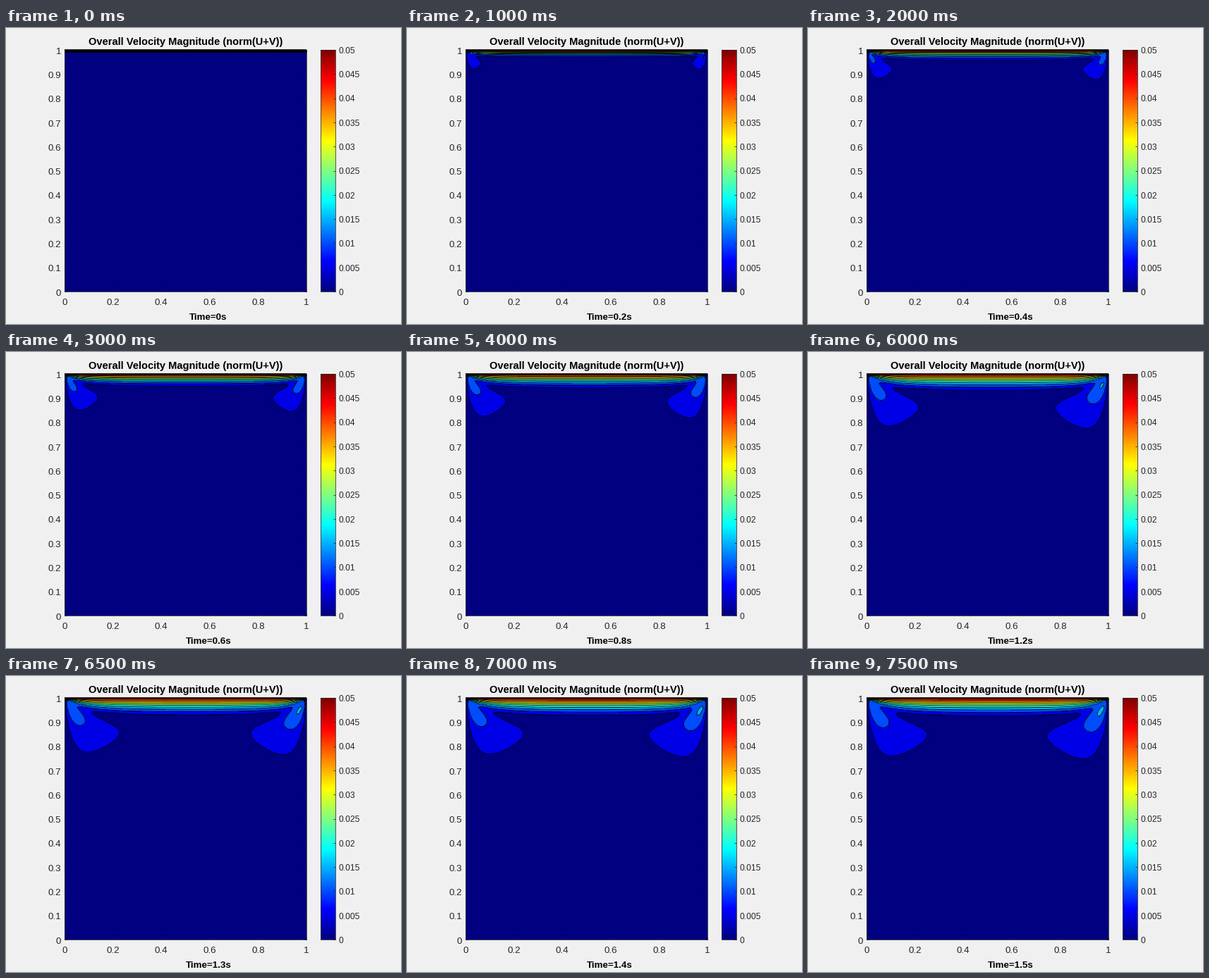
These frames come from a looping animation (560 by 420 pixels, 8 s). A matplotlib script:

```python
import numpy as np
import matplotlib.pyplot as plt
from matplotlib.animation import FuncAnimation
from matplotlib.colors import ListedColormap
from matplotlib.patches import Rectangle

W, H, DPI = 560, 420, 100
FRAMES, INTERVAL = 16, 500
LEFT, TOP, SIDE = 83, 31, 343
BAR_X, BAR_W = 446, 21
RIGHT, BOTTOM = LEFT + SIDE, TOP + SIDE
INK = "#262626"

# Lid-driven cavity on a staggered grid
N = 99
STEP = 1 / (N + 1)
LID, NU, DT = 0.05, 1e-3, 0.005
STEPS_PER_FRAME = 20

k = np.arange(N)
COS = np.cos(np.pi * np.outer(k, k + 0.5) / N) * np.sqrt(2 / N)
COS[0] /= np.sqrt(2)
eig = (2 * np.cos(np.pi * k / N) - 2) / STEP**2
EIG = eig[:, None] + eig[None, :]
EIG[0, 0] = 1


def rate(a, b):
    """Diffusion minus advection of padded component a, carried across by b."""
    c = a[1:-1, 1:-1]
    up, down, east, west = a[2:, 1:-1], a[:-2, 1:-1], a[1:-1, 2:], a[1:-1, :-2]
    cross = (b[:-1, 1:-2] + b[1:, 1:-2] + b[:-1, 2:-1] + b[1:, 2:-1]) / 4
    diffusion = NU * (up + down + east + west - 4 * c) / STEP**2
    return diffusion - (c * (east - west) + cross * (up - down)) / (2 * STEP)


def advance(u, v):
    du, dv = rate(u, v), rate(v.T, u.T).T
    u[1:-1, 1:-1] += DT * du
    v[1:-1, 1:-1] += DT * dv
    div = (np.diff(u[1:-1], axis=1) + np.diff(v[:, 1:-1], axis=0)) / STEP
    spec = COS @ div @ COS.T / EIG
    spec[0, 0] = 0
    phi = COS.T @ spec @ COS
    u[1:-1, 1:-1] -= np.diff(phi, axis=1) / STEP
    v[1:-1, 1:-1] -= np.diff(phi, axis=0) / STEP


def speed(u, v):
    s = np.zeros((N + 2, N + 2))
    uc = (u[1:-1, 1:] + u[1:-1, :-1]) / 2
    vc = (v[1:, 1:-1] + v[:-1, 1:-1]) / 2
    s[1:-1, 1:-1] = np.hypot(uc, vc)
    s[-1] = LID
    return s


def simulate():
    u, v = np.zeros((N + 2, N + 1)), np.zeros((N + 1, N + 2))
    u[-1] = LID
    fields = [speed(u, v)]
    for _ in range(FRAMES - 1):
        for _ in range(STEPS_PER_FRAME):
            advance(u, v)
        fields.append(speed(u, v))
    return fields


def jet(t):
    t = np.asarray(t)[:, None]
    return np.clip(1.5 - np.abs(4 * t - np.array([3, 2, 1])), 0, 1)


fields = simulate()
nodes = np.linspace(0, 1, N + 2)
px, py = LEFT + SIDE * nodes, BOTTOM - SIDE * nodes
levels = np.linspace(0, LID, 11)
bands = jet(np.arange(10) / 10)

plt.rcParams["font.family"] = "Liberation Sans"
fig = plt.figure(figsize=(W / DPI, H / DPI), dpi=DPI, facecolor="#f0f0f0")
ax = fig.add_axes([0, 0, 1, 1])
ax.set_axis_off()


def label(x, y, text, size, **kw):
    """Text with its baseline at pixel y and its size in pixels."""
    return ax.text(x, y, text, fontsize=size * 72 / DPI, va="baseline", **kw)


def line(x, y, color=INK, width=0.55, z=5):
    ax.plot(x, y, color=color, lw=width, zorder=z, solid_capstyle="butt")


def frame_box(x, y, w, h):
    ax.add_patch(Rectangle((x, y), w, h, fill=False, ec=INK, lw=0.55, zorder=5))


ax.add_patch(Rectangle((LEFT, TOP), SIDE, SIDE, fc=bands[0], lw=0, zorder=0))
frame_box(LEFT, TOP, SIDE, SIDE)
line([LEFT, RIGHT], [TOP, TOP], "black", 1.1, 6)

tick = 3.4
for i in range(11):
    y = BOTTOM - SIDE * i / 10
    line([LEFT, LEFT + tick], [y, y])
    line([RIGHT - tick, RIGHT], [y, y])
    label(78, y + 5.7, f"{i / 10:g}", 13.33, ha="right", color=INK)
for i in range(6):
    x = LEFT + SIDE * i / 5
    line([x, x], [BOTTOM - tick, BOTTOM])
    label(x, 393, f"{i / 5:g}", 13.33, ha="center", color=INK)

ramp = jet(np.linspace(0, 1, 256))
ax.imshow(np.arange(256)[:, None], cmap=ListedColormap(ramp), origin="lower",
          extent=(BAR_X, BAR_X + BAR_W, BOTTOM, TOP), aspect="auto",
          interpolation="nearest", zorder=1)
frame_box(BAR_X, TOP, BAR_W, SIDE)
for i in range(11):
    y = BOTTOM - SIDE * i / 10
    line([BAR_X + BAR_W - tick, BAR_X + BAR_W], [y, y])
    label(472, y + 4.9, f"{i * 0.005:g}", 12, ha="left", color=INK)

label(255, 24, "Overall Velocity Magnitude (norm(U+V))", 14.67,
      ha="center", weight="bold")
clock = label(287, 414, "", 13.33, ha="center", weight="bold")
clock.set_x(287)

ax.set_xlim(0, W)
ax.set_ylim(H, 0)
ax.set_autoscale_on(False)
shown = []


def update(i):
    while shown:
        shown.pop().remove()
    shown.append(ax.contourf(px, py, fields[i], levels, colors=bands, zorder=2))
    shown.append(ax.contour(px, py, fields[i], levels[1:-1], colors="black",
                            linewidths=0.65, zorder=3))
    clock.set_text(f"Time={i / 10:g}s")
    ax.set_xlim(0, W)
    ax.set_ylim(H, 0)
    return shown


anim = FuncAnimation(fig, update, frames=FRAMES, interval=INTERVAL,
                     repeat=True, repeat_delay=0, blit=False)
plt.show()
```
